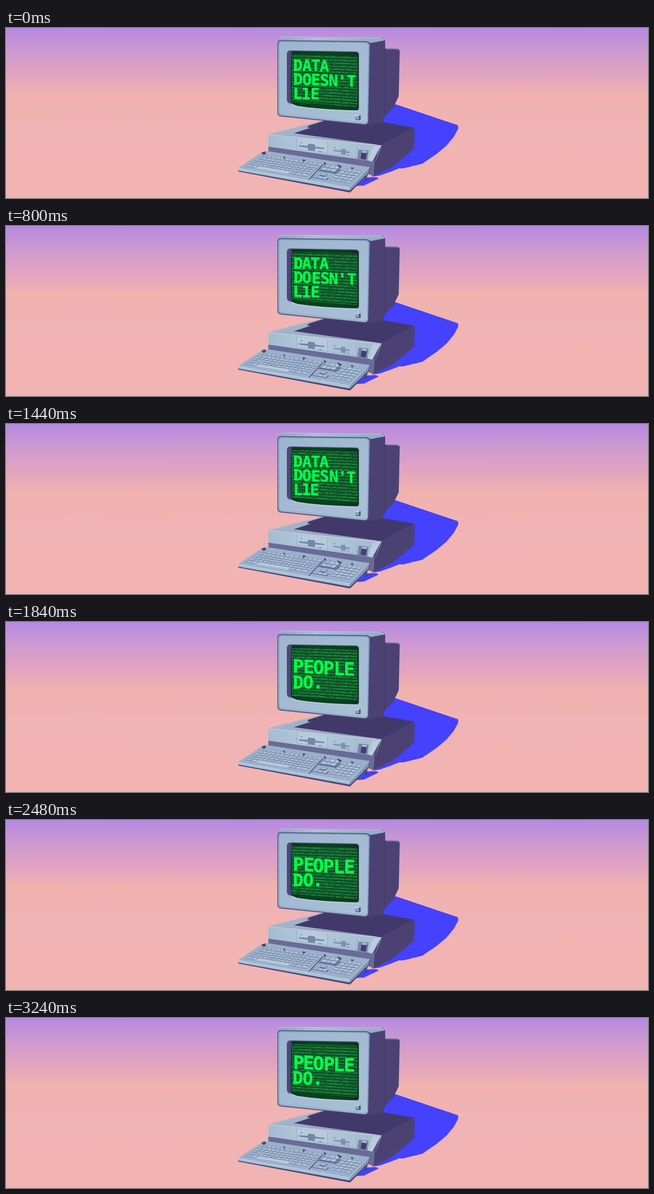
Recreate the animation shown at these times as an HTML page. Size 1280 by 341 pixels, loop 3280 ms.

```html
<!DOCTYPE html>
<html lang="en">
<head>
<meta charset="utf-8">
<title>Data doesn't lie</title>
<style>
  html, body { margin: 0; width: 100%; height: 100%; overflow: hidden; background: #f1b4b3; }
  svg { display: block; width: 100%; height: 100%; }
  #rows { font: 700 5.3px "DejaVu Sans Mono", monospace; fill: #2fb559; }
  #words { font-family: "DejaVu Sans Mono", monospace; font-weight: 700; fill: #05fb4b; stroke: #05fb4b; stroke-width: .5; }
</style>
</head>
<body>
<svg viewBox="0 0 1280 341" preserveAspectRatio="none">
  <defs>
    <linearGradient id="sky" x2="0" y2="1">
      <stop offset="0" stop-color="#b58ae1"/>
      <stop offset=".15" stop-color="#cf9bce"/>
      <stop offset=".28" stop-color="#e2a4bf"/>
      <stop offset=".4" stop-color="#f1b2b0"/>
      <stop offset=".6" stop-color="#f0b4b4"/>
      <stop offset="1" stop-color="#f2b4b2"/>
    </linearGradient>
    <linearGradient id="face" x2="1" y2="1">
      <stop offset="0" stop-color="#9db5cf"/>
      <stop offset=".5" stop-color="#a3bbd3"/>
      <stop offset="1" stop-color="#a9c1d6"/>
    </linearGradient>
    <linearGradient id="lid" x2="1" y2="0">
      <stop offset="0" stop-color="#8ea4c2"/>
      <stop offset=".35" stop-color="#a8bfd6"/>
      <stop offset="1" stop-color="#93a9c6"/>
    </linearGradient>
    <linearGradient id="deck" x2="1" y2=".4">
      <stop offset="0" stop-color="#a9bfd4"/>
      <stop offset="1" stop-color="#8498b6"/>
    </linearGradient>
    <linearGradient id="front" x2="1" y2="0">
      <stop offset="0" stop-color="#a5bbd1"/>
      <stop offset=".4" stop-color="#b3c9da"/>
      <stop offset="1" stop-color="#a4bad0"/>
    </linearGradient>
    <linearGradient id="wall" x2="1" y2="0">
      <stop offset="0" stop-color="#4b4879"/>
      <stop offset="1" stop-color="#655f92"/>
    </linearGradient>
    <radialGradient id="glass" r=".72">
      <stop offset="0" stop-color="#084720"/>
      <stop offset=".65" stop-color="#09401d"/>
      <stop offset="1" stop-color="#0d2b18"/>
    </radialGradient>
    <clipPath id="pane"><path d="M572 46.500L697 48.500Q703 49 703 54V160Q703 165 697 164.800Q620 163 580 156Q569 153 568 147Q566.500 95 569 51Q569.500 46.500 572 46.500Z"/></clipPath>
    <clipPath id="area"><path d="M569 52L701 56V159L569 148Z"/></clipPath>
  </defs>

  <rect width="1280" height="341" fill="url(#sky)"/>

  <!-- cast shadow -->
  <path fill="#4441ff" d="M774 152L901 195L902 201L893 218L878 236L858 253L833 270L831 272L790 282L785 281L765 289L745 296L730 298L735 250L748 178Z"/>
  <path fill="#4441ff" d="M698 317L716 300L738 299L743 302L728 309L714 316Z"/>

  <!-- base unit -->
  <path fill="url(#deck)" d="M523 213L606 192L640 184L760 192L815 200L749 235Z"/>
  <path fill="#42396b" d="M574 211L608 200L601 200L603 196L635 186L722 192L752 189L815 200L749 235Z"/>
  <path fill="#4b4273" d="M749 235L815 200L814 242L771 278L733 297V268Z"/>
  <path fill="#6a6b98" d="M523 236L735 266L733 297L700 285L523 248Z"/>
  <path fill="url(#front)" d="M523 213.500L749 235.500L737 268L523 238Z"/>
  <path fill="none" stroke="#c2d4e1" d="M523 214L747 236"/>
  <g fill="none" stroke="#92a8c1" stroke-width=".8">
    <path d="M580 221L579 244M641 227V253M700 234L698 260M580 243L698 260"/>
  </g>
  <path fill="#bacddd" opacity=".7" d="M582 223L640 229V250L582 242Z"/>
  <path fill="#7387a9" d="M584 235L602 236.500V232L616 233.500V238L635 240.500V243L616 241.500V247L602 245V240.500L584 238Z"/>
  <path fill="#7d91b1" d="M653 244L668 246V242L677 243V247L685 248V251L677 250.500V255L668 253.500V249L653 247Z"/>
  <path fill="#8298b6" d="M587 229H591V231H587ZM623 247H630V249H623ZM653 239H657V241H653ZM680 254H684V256H680Z"/>
  <path fill="#7684a8" d="M703 244L723 246L720 267L700 264Z"/>
  <path fill="#443e70" d="M709 247L720 248L717 264L707 262Z"/>
  <path fill="#a9bed3" d="M710 246L720 247L719 251L709 250Z"/>
  <path fill="#bacddd" d="M731 238L748 236L730 268L722 266Z"/>
  <path fill="#544d80" d="M747 237L737 268L731 267Z"/>

  <!-- keyboard -->
  <path fill="#4c4878" d="M515 247L726 281L722 294L686 330L463 288V283Z"/>
  <path fill="#9ab0ca" d="M515 246L725 279L686 320L463 281Z"/>
  <path fill="#a9c0d5" d="M463 281L686 320L685 326L463 286Z"/>
  <path fill="none" stroke="#bfd2e2" stroke-width="1.300" d="M464 281.500L685 320.500L724 280"/>
  <path fill="#8196b6" d="M686 320L725 279L722 291L685 327Z"/>
  <path fill="none" stroke="#403c6b" stroke-width="2" d="M713 300L719 297V304L715 306"/>
  <g id="keys"></g>
  <path fill="none" stroke="#504c7c" stroke-width="1.800" d="M632 274L604 304M667 284L655 293"/>
  <path fill="#47436f" d="M509 250L516 248L519 251L514 255ZM553 257L557 260L554 263ZM592 263L598 265L592 269ZM634 269L639 271L634 275ZM660 273L670 278L664 280ZM688 279L694 281L689 284Z"/>

  <!-- monitor body -->
  <path fill="#4b4273" d="M720 28L752 20L756 25V41L780 41.500Q785 42 785 46L783 137L772 160L764 168L754 178L751 190L722 195Z"/>
  <path fill="none" stroke="#3e3767" d="M755 42V180"/>
  <path fill="none" stroke="#7c7ea9" stroke-width="1.500" d="M757 42L780 42.500L784 44"/>
  <path fill="url(#lid)" d="M541 28Q541 20 552 17.500L746 20Q755 21 755 25L728 30L545 30Z"/>
  <path fill="none" stroke="#b7cbdd" stroke-width="1.200" d="M545 22Q549 18 557 18L746 20.500Q752 21 754 24"/>
  <path fill="#4b4878" d="M541 32Q541 24.500 548 24.500L718 26.500Q727 27 727 34L723 189Q722 195 715 194.500L548 177.500Q541 176 541 170Z"/>
  <path fill="#879dbd" d="M542 33Q542 26 549 26L717 28Q725 28.500 725 35L722 187Q721 193.500 714 193L549 176Q542 175 542 168Z"/>
  <path fill="url(#face)" d="M545 35Q545 28 551 28L716 30Q722.500 30 722.500 36L720 185Q719 190 713 189.500L551 172Q545 171 545 166Z"/>
  <path fill="none" stroke="#bed0df" stroke-width="1.200" d="M546 170Q548 173 553 173.500L713 191Q719 191 720 186"/>

  <!-- screen recess -->
  <path fill="url(#wall)" d="M560 53Q560 45 567 45L698 47Q704 47 704 53V161Q704 166 698 166Q620 164 578 157L565 152Q560 149 560 143Z"/>
  <path fill="#b4c8da" d="M562 149L569 152Q620 164 704 165.500Q702 168 697 168Q620 166 575 157.500Z"/>
  <g clip-path="url(#pane)">
    <rect x="560" y="40" width="150" height="130" fill="url(#glass)"/>
    <g clip-path="url(#area)"><g id="rows"></g></g>
    <g id="words"></g>
  </g>

  <!-- power button -->
  <path fill="#4a4676" d="M696 176L707 175V184L702 185L696 183Z"/>
  <path fill="#c0d2e0" d="M695 175L705 174.500L704 177L696 177.500Z"/>
  <path fill="#8da1be" d="M696 177.500H704V183.500L696 182.500Z"/>
</svg>
<script>
const NS = "http://www.w3.org/2000/svg";
const FRAME = 40, FRAMES = 82, ROWS = 24, PITCH = 5.8;
const $ = id => document.getElementById(id);

function add(parent, tag, attrs, text) {
  const el = document.createElementNS(NS, tag);
  for (const k in attrs) el.setAttribute(k, attrs[k]);
  if (text) el.textContent = text;
  return parent.appendChild(el);
}

function noise(a, b) {
  const s = Math.sin(a * 127.1 + b * 311.7) * 43758.5453;
  return s - Math.floor(s);
}

// Keyboard surface: u runs along a row, v from back to front.
function onBoard(u, v) {
  const x = 513 + 207 * u + v * (-43 + 9 * u);
  const y = 251 + 33 * u + v * (27 + 4 * u);
  return x.toFixed(1) + " " + y.toFixed(1);
}

function quad(u, v, w, h, fill) {
  const pts = [[u, v], [u + w, v], [u + w, v + h], [u, v + h]];
  add($("keys"), "path", { fill, d: "M" + pts.map(p => onBoard(...p)).join("L") + "Z" });
}

function keyBlock(u, v, w, h, cols, rows) {
  quad(u, v, w, h, "#7d90b0");
  const kw = w / cols, kh = h / rows;
  for (let r = 0; r < rows; r++)
    for (let c = 0; c < cols; c++) {
      const fill = noise(c, r) > .3 ? "#b4c9db" : "#a6bdd3";
      quad(u + c * kw + .003, v + r * kh + .02, kw - .009, kh - .06, fill);
    }
}

keyBlock(.02, .08, .57, .14, 13, 1);
keyBlock(.02, .27, .57, .52, 14, 4);
keyBlock(.02, .8, .1, .15, 2, 1);
quad(.125, .82, .29, .13, "#b6cbdc");
keyBlock(.42, .8, .17, .15, 3, 1);
quad(.62, .06, .15, .45, "#62658f");
keyBlock(.625, .06, .135, .38, 3, 2);
quad(.675, .61, .055, .17, "#5d608b");
keyBlock(.675, .59, .05, .15, 1, 1);
quad(.635, .8, .14, .15, "#5d608b");
keyBlock(.635, .78, .13, .15, 3, 1);
keyBlock(.8, .14, .18, .78, 4, 5);

const rows = Array.from({ length: ROWS }, (_, r) => {
  const bits = Array.from({ length: 42 }, (_, c) => noise(r + 3, c + 1) < .48 ? "0" : "1");
  return add($("rows"), "text", {}, bits.join(""));
});

// x, baseline, letter pitch, size, slope
const SCENES = [
  [["DATA", 573, 85.8, 17.3, 31, .012],
   ["DOESN'T", 573, 113.3, 17.7, 31, .037],
   ["LIE", 572.5, 142.5, 17, 31, .01]],
  [["PEOPLE", 572, 101.6, 20.2, 37, .05],
   ["DO.", 572, 132.6, 19.6, 35, .012]]
].map(lines => {
  const group = add($("words"), "g", {});
  const letters = lines.flatMap(([word, x, y, pitch, size, slope]) =>
    [...word].map((ch, i) => {
      const el = add(group, "g", {});
      add(el, "text", { "font-size": size }, ch);
      if (ch === "D") {
        const cap = size * .729;
        add(el, "path", { d: `M.6 0H5V-4.500H2ZM.6 ${-cap}H5V${4.5 - cap}H2Z` });
      }
      if (ch === "I")
        add(el, "rect", { x: size * .405, y: -size * .75, width: 8, height: 6, fill: "#09401d", stroke: "none" });
      return { el, x: x + i * pitch, y: y + i * pitch * slope, slope };
    }));
  return { group, letters };
});

function draw(frame) {
  const shift = frame / FRAMES * ROWS;
  rows.forEach((el, r) => {
    const k = (r - shift + ROWS) % ROWS;
    const y = 46 + k * PITCH;
    const slope = .03 + .04 * (y - 52) / 95;
    el.setAttribute("transform", `matrix(1 ${slope.toFixed(4)} 0 1 569.500 ${y.toFixed(2)})`);
  });
  const active = frame < FRAMES / 2 ? 0 : 1;
  SCENES.forEach(({ group, letters }, s) => {
    group.setAttribute("display", s === active ? "inline" : "none");
    if (s !== active) return;
    const beat = Math.floor(frame / 3);
    letters.forEach(({ el, x, y, slope }, i) => {
      const dx = (noise(i + 1, beat) - .5) * 1.6;
      const dy = (noise(i + 21, beat) - .5) * 1.2;
      el.setAttribute("transform", `matrix(1 ${slope} 0 1 ${(x + dx).toFixed(2)} ${(y + dy).toFixed(2)})`);
    });
  });
}

const start = performance.now();
function tick() {
  const t = Math.max(0, performance.now() - start);
  draw(Math.floor(t / FRAME) % FRAMES);
  requestAnimationFrame(tick);
}
tick();
</script>
</body>
</html>
```
